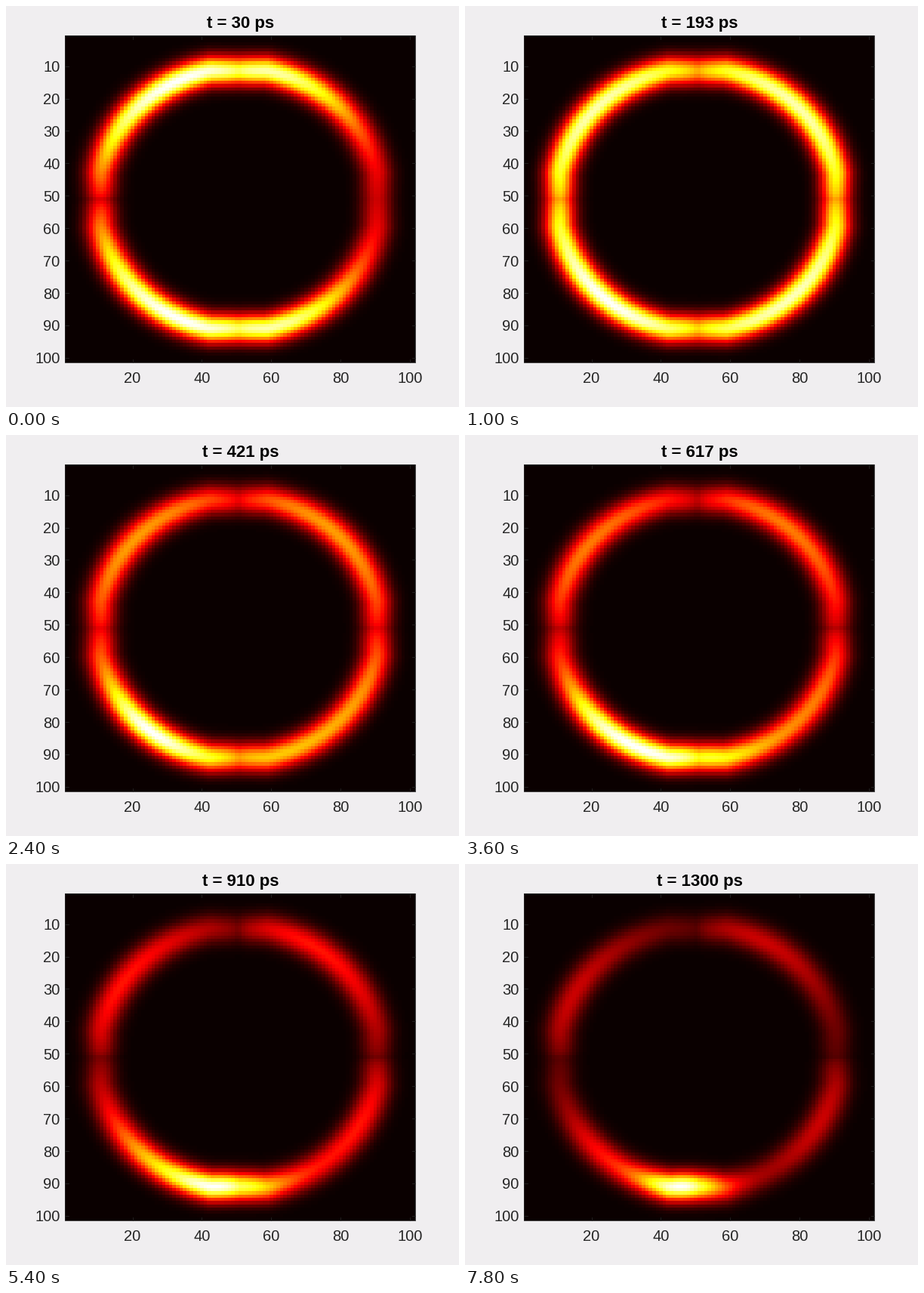
Write a matplotlib script that moves like this. It is 600 by 531 pixels and loops after 8000 ms.

```python
import math

import numpy as np
import matplotlib.pyplot as plt
from matplotlib.animation import FuncAnimation

W, H, DPI = 600, 531, 100
LEFT, RIGHT, TOP, BOTTOM = 78, 542, 39, 472
N = 101
FRAMES, INTERVAL = 40, 200
CX, CY = 50.6, 51.2
RADIUS, FLAT, SIGMA = 40.6, 39.8, 3.1
INK = (0.15, 0.15, 0.15)


def px(col):
    return LEFT + (col - 0.5) * (RIGHT - LEFT) / N


def py(row):
    return TOP + (row - 0.5) * (BOTTOM - TOP) / N


def ease(u):
    u = min(max(u, 0), 1)
    return u * u * (3 - 2 * u)


# Circle flattened on its four sides, with a Gaussian cross-section
col, row = np.meshgrid(np.arange(1, N + 1), np.arange(1, N + 1))
dx, dy = col - CX, row - CY
dist = np.maximum(np.hypot(dx, dy) - RADIUS,
                  np.maximum(abs(dx), abs(dy)) - FLAT)
ring = np.exp(-dist ** 2 / (2 * SIGMA ** 2))

# Angle clockwise from the top, and the four diagonal lobes
theta = np.arctan2(dx, -dy) % (2 * np.pi)
degrees = np.degrees(theta)
lobes = abs(np.sin(2 * theta)) ** 0.6
lean = np.cos(2 * (theta % (np.pi / 2)))


def spot(center, width):
    return np.exp(-((degrees - center) / width) ** 2 / 2)


def field(i):
    s = i / (FRAMES - 1)
    start = 1 - ease(s / 0.12)
    floor = 0.08 + 0.65 * math.exp(-s / 0.35)
    peak = 0.8 - 0.52 * s + 0.25 * math.exp(-s / 0.12)

    # Early left-right imbalance, later a clockwise skew of each lobe
    diagonal = (peak - floor) * (1 + 0.6 * s * s * lean)
    diagonal = diagonal - 0.25 * start * np.sin(theta)
    light = floor + diagonal * lobes + 0.35 * start * np.cos(2 * theta)

    # Light gathers at the lower left, then at the bottom
    light += ease((s - 0.08) / 0.22) * (0.46 - 0.34 * s) * spot(222, 16)
    light += 0.85 * ease(s / 0.8) * spot(185, 27 - 14 * s)
    z = ring * light
    return z / z.max()


fig = plt.figure(figsize=(W / DPI, H / DPI), dpi=DPI, facecolor="#f0eef0")
ax = fig.add_axes([0, 0, 1, 1])
ax.axis("off")


def label(x, y, text, size, **style):
    return ax.text(x, y, text, fontsize=size * 72 / DPI, va="baseline",
                   family="Liberation Sans", **style)


image = ax.imshow(field(0), cmap="hot", vmin=0, vmax=1, aspect="auto",
                  interpolation="nearest", extent=(LEFT, RIGHT, BOTTOM, TOP))
ax.set_xlim(0, W)
ax.set_ylim(H, 0)

tick = dict(color=INK, lw=0.6)
ax.plot([LEFT, RIGHT, RIGHT, LEFT, LEFT], [TOP, TOP, BOTTOM, BOTTOM, TOP], **tick)
for v in range(20, 101, 20):
    x = px(v)
    ax.plot([x, x], [BOTTOM, BOTTOM - 4.5], **tick)
    ax.plot([x, x], [TOP, TOP + 4.5], **tick)
    label(x, 499, str(v), 20.2, ha="center", color=INK)
for v in range(10, 101, 10):
    y = py(v)
    ax.plot([LEFT, LEFT + 4.5], [y, y], **tick)
    ax.plot([RIGHT, RIGHT - 4.5], [y, y], **tick)
    label(71.5, y + 7.7, str(v), 20.2, ha="right", color=INK)

title = label(310.5, 28.5, "", 22.3, ha="center", weight="bold", color="black")


def update(i):
    image.set_data(field(i))
    title.set_text(f"t = {math.ceil(30 + 32.56 * i)} ps")
    return image, title


anim = FuncAnimation(fig, update, frames=FRAMES, interval=INTERVAL,
                     repeat=True, repeat_delay=0)
plt.show()
```
